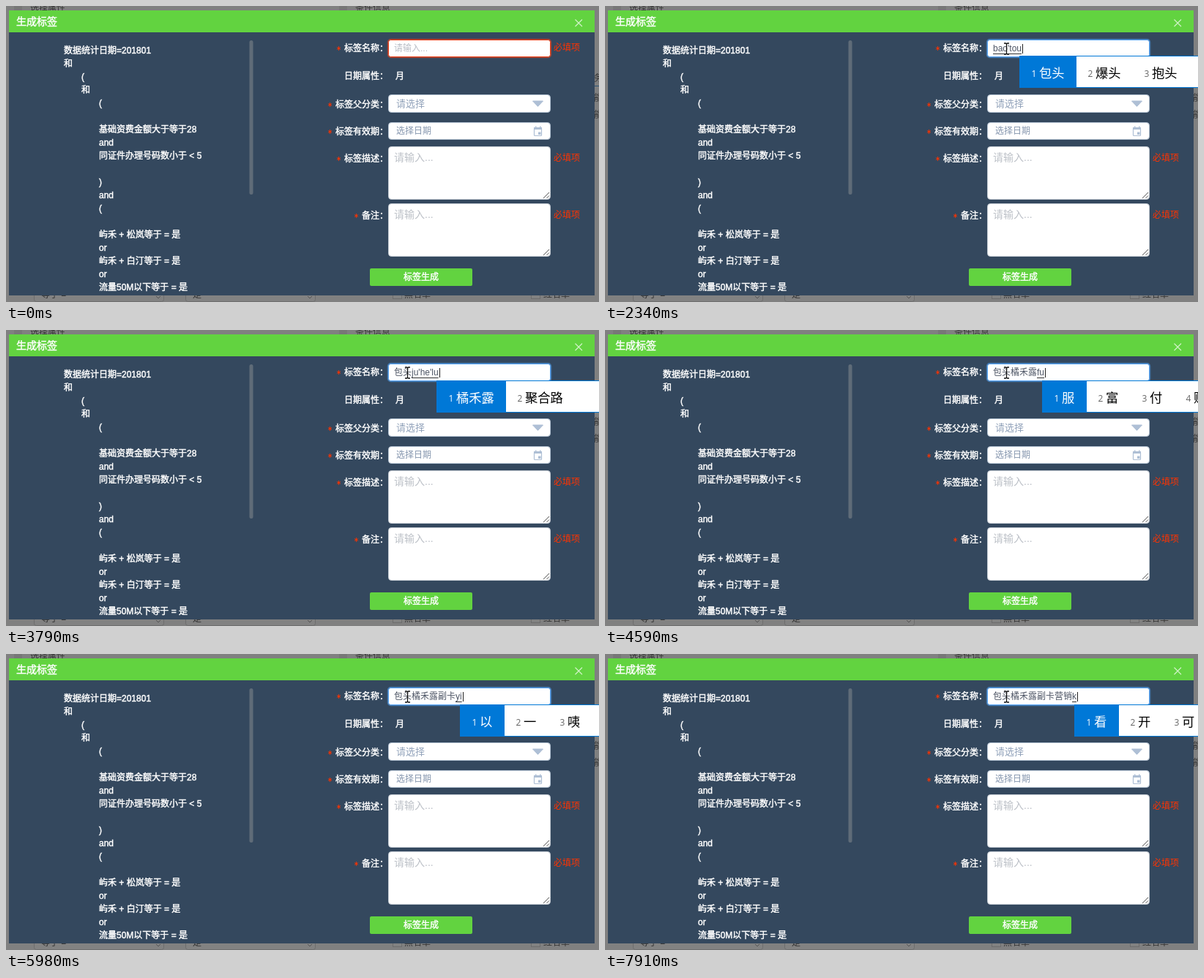
Animation of 810x405 px, one loop 8000 ms. Source, as an HTML page:

```html
<!DOCTYPE html>
<html lang="zh-CN">
<head>
<meta charset="utf-8">
<title>生成标签</title>
<style>
  html, body { margin: 0; width: 100%; height: 100%; overflow: hidden; background: #808080; }
  svg { display: block; width: 100%; height: 100%; }
  text { font: 400 12px "Liberation Sans", "Noto Sans CJK SC", "Noto Sans CJK", sans-serif; white-space: pre; }
  .strong { stroke: #fff; stroke-width: .45px; }
  .num { font: 400 12px "Open Sans", "Noto Sans", sans-serif; }
  .han { font: 400 17.3px "Noto Sans CJK SC", "Noto Sans CJK", sans-serif; }
</style>
</head>
<body>
<svg id="stage" viewBox="0 0 810 405">
  <defs>
    <filter id="soft" x="-5%" y="-40%" width="110%" height="180%"><feGaussianBlur stdDeviation=".7"/></filter>
  </defs>
  <g id="page"></g>
  <g id="panel"></g>
  <g id="field">
    <rect id="glow" x="521.5" y="45.5" width="223" height="25" rx="4" fill="none" stroke-width="1.5" opacity=".6" filter="url(#soft)"/>
    <rect id="box" x="522.5" y="46.5" width="221" height="23" rx="3" fill="#fff"/>
    <text id="hint" x="530" y="62" fill="#b9bdc5">请输入...</text>
    <text id="done" x="530" y="62" fill="#4d5565"></text>
    <text id="comp" y="62" fill="#4d5565"></text>
    <rect id="under" y="65" height="1" fill="#333"/>
    <rect id="caret" y="52" width="1" height="13" fill="#222"/>
    <text id="need" x="748" y="61" fill="#ff3300">必填项</text>
  </g>
  <g id="ime"></g>
  <path id="arrow" d="M0 0V16L3.7 12.6L6.2 18.3L8.6 17.3L6.1 11.6H11Z" fill="#fff" stroke="#000" stroke-width=".9"/>
  <path id="beam" d="M-3.5 -7.5H-1L0 -6.5L1 -7.5H3.5M0 -6.5V6.5M-3.5 7.5H-1L0 6.5L1 7.5H3.5" fill="none" stroke="#111" stroke-width="1.3"/>
</svg>
<script>
const $ = id => document.getElementById(id);
const text = (x, y, s, fill, extra = '') =>
  `<text x="${x}" y="${y}" fill="${fill}" ${extra}>${s.replace(/</g, '&lt;')}</text>`;
const strong = (x, y, s, style = '') => text(x, y, s, '#fff', `class="strong" style="${style}"`);
const rect = (x, y, w, h, fill, extra = '') =>
  `<rect x="${x}" y="${y}" width="${w}" height="${h}" fill="${fill}" ${extra}/>`;
const line = (d, stroke, width = 1) =>
  `<path d="${d}" fill="none" stroke="${stroke}" stroke-width="${width}"/>`;

// Dimmed page behind the dialog
function drawPage() {
  const ink = '#343434', edge = '#6d6d6d';
  const frame = `stroke="${edge}"`;
  return rect(0, 0, 810, 405, '#808080') +
    rect(11, 0, 11, 6, '#777') + rect(455, 0, 11, 6, '#777') +
    text(33, 7, '选择属性', ink) + text(477, 7, '条件信息', ink) +
    rect(38.5, 380.5, 177, 24, '#828282', 'rx="3" ' + frame) +
    rect(245.5, 380.5, 177, 24, '#828282', 'rx="3" ' + frame) +
    text(48, 399, '等于 =', ink) + text(255, 399, '是', ink) +
    line('M205 397l3 3l3 -3M412 397l3 3l3 -3', '#555') +
    rect(528.5, 388.5, 12, 12, '#828282', frame) + text(544, 399, '黑名单', ink) +
    rect(717.5, 388.5, 12, 12, '#828282', frame) + text(734, 399, '红名单', ink) +
    rect(804, 109, 6, 1, '#2d5475') +
    text(803, 103, '务', ink) + text(803, 130, '能', ink) + text(803, 153, '能', ink);
}

// Rule text on the left: [indent level, text]; empty rows keep the rhythm
const rules = [
  [0, '数据统计日期=201801'], [0, '和'], [1, '('], [1, '和'], [2, '('], [2, ''],
  [2, '基础资费金额大于等于28'], [2, 'and'], [2, '同证件办理号码数小于 < 5'], [2, ''],
  [2, ')'], [2, 'and'], [2, '('], [2, ''],
  [2, '屿禾 + 松岚等于 = 是'], [2, 'or'], [2, '屿禾 + 白汀等于 = 是'], [2, 'or'],
  [2, '流量50M以下等于 = 是']
];

const red = '#ff3300';
function label(y, s, required = true) {
  const x = 510 - 12 * s.length;
  const star = `M${x - 7.5} ${y - 7}v6M${x - 10} ${y - 5.5}l5 3M${x - 10} ${y - 2.5}l5 -3`;
  return (required ? line(star, red, .9) : '') + strong(x, y, s + '：');
}
function area(y) {
  return rect(522.5, y + .5, 221, 72, '#fff', 'rx="4" stroke="#c3cad2"') +
    text(530, y + 20, '请输入...', '#bcc0c7', 'style="font-size:14px"') +
    line(`M734 ${y + 71}l8 -8M738.5 ${y + 71}l3.5 -3.5`, '#555') +
    text(748, y + 20, '必填项', red);
}

function drawPanel() {
  const icon = '#aebfd5', border = 'rx="4" stroke="#b4c3d3"';
  return rect(4, 6, 800, 390, '#34485e') + rect(4, 6, 800, 30, '#62d340') +
    strong(14, 26, '生成标签', 'font-size:14px') +
    line('M777.5 18.5l9.5 9.5M787 18.5l-9.5 9.5', '#d3f3ca', 1.1) +
    rect(332.5, 47, 5, 211, '#5f6c78', 'rx="2.5"') +
    rules.map(([n, s], i) => strong(79 + 24 * n, 65 + 18 * i, s)).join('') +
    label(62, '标签名称') + label(100, '日期属性', false) + strong(532, 100, '月') +
    label(139, '标签父分类') + label(176, '标签有效期') +
    label(213, '标签描述') + label(291, '备注') +
    rect(522.5, 121.5, 221, 24, '#fff', border) +
    text(533, 138, '请选择', '#91a2ba', 'style="font-size:13px"') +
    `<path d="M719.5 130H733.5L726.5 137.5Z" fill="${icon}" stroke="${icon}" stroke-linejoin="round"/>` +
    rect(522.5, 159.5, 221, 23, '#fff', border) +
    text(533, 175, '选择日期', '#8596ae') +
    rect(721.5, 166.5, 10, 11, '#fff', `rx="1" stroke="${icon}" stroke-width="1.2"`) +
    rect(721, 166, 11, 3, icon) + rect(723, 164.5, 1.5, 3, icon) + rect(729, 164.5, 1.5, 3, icon) +
    rect(727, 172.5, 3.5, 3.5, icon) +
    area(192) + area(270) +
    rect(497, 359, 140, 24, '#62d340', 'rx="2"') + strong(543, 375, '标签生成');
}

// [time, accepted text, letters being composed, candidates]
const a = '包头', b = a + '橘禾露', c = b + '副卡', d = c + '营销';
const steps = [
  [0, '', '', ''],
  [1800, '', 'b', '不 吧 把 被'],
  [1935, '', 'ba', '吧 把 八 爸'],
  [2070, '', 'bao', '包 报 抱 宝'],
  [2205, '', "bao't", '包头 抱团 暴徒'],
  [2340, '', "bao'tou", '包头 爆头 抱头'],
  [2620, a, '', ''],
  [2900, a, 'j', ''],
  [3020, a, 'j', '就 将 及 家 级'],
  [3140, a, 'ju', '就 据 局 句 举'],
  [3410, a, "ju'h", '聚会 菊花 句话'],
  [3535, a, "ju'he", '聚合 句和 据和'],
  [3660, a, "ju'he'l", '聚合了 聚合力'],
  [3790, a, "ju'he'lu", '橘禾露 聚合路'],
  [4320, b, '', ''],
  [4450, b, 'f', '发 分 放 非'],
  [4590, b, 'fu', '服 富 付 赋'],
  [4880, b, "fu'k", '付款 副科 富矿'],
  [5020, b, "fu'ka", '副卡 付卡 浮卡'],
  [5550, c, '', ''],
  [5700, c, 'y', ''],
  [5840, c, 'y', '有 一 要 也'],
  [5980, c, 'yi', '以 一 咦 已'],
  [6130, c, 'yin', '因 音 引 银'],
  [6260, c, 'ying', '应 英 影 赢'],
  [6400, c, "ying'xi", '影戏 迎喜'],
  [6530, c, "ying'xia", '影下 应下'],
  [6950, c, "ying'xiao", '影下 应下'],
  [7070, c, "ying'xiao", '营销 影效'],
  [7480, d, '', ''],
  [7910, d, 'k', '看 开 可 快']
];

function drawIme(left, top, words) {
  let x = left, out = rect(left, top, 900, 44, '#fff') + rect(left, top, 900, 1, '#0078d7') +
    rect(left, top + 43, 900, 1, '#0078d7');
  words.forEach((w, i) => {
    const width = 43 + 17 * w.length;
    if (!i) out += rect(x, top, width + 1, 44, '#0078d7');
    out += text(x + 16.5, top + 28.5, String(i + 1), i ? '#666' : '#fff', 'class="num"') +
      text(x + 27, top + 30, w, i ? '#000' : '#fff', 'class="han"');
    x += width;
  });
  return out;
}

const show = (id, on) => { $(id).style.display = on ? '' : 'none'; };

function drawField([, done, comp, words], focused) {
  const filled = done || comp;
  const start = 530 + 12 * done.length;
  $('done').textContent = done;
  $('comp').textContent = comp;
  $('comp').setAttribute('x', start);
  const width = comp ? $('comp').getComputedTextLength() : 0;
  const caret = start + Math.round(width) + (comp ? 1 : 0);
  $('under').setAttribute('x', start);
  $('under').setAttribute('width', width);
  $('caret').setAttribute('x', caret);
  show('caret', focused);
  show('hint', !filled);
  show('need', !filled);
  $('box').setAttribute('stroke', filled ? '#57a3f3' : '#e8401a');
  $('glow').setAttribute('stroke', filled ? '#4d97e0' : '#e0411c');
  $('ime').innerHTML = words ? drawIme(caret - 4, done ? 69 : 68, words.split(' ')) : '';
}

// The pointer glides in with eight sampled positions, then settles
function drawPointer(t) {
  const k = Math.min(7, Math.floor((t - 410) / 141.4)) / 7;
  const ease = k * (2 - k);
  const x = Math.round(440 + 108 * ease);
  const y = t >= 1520 ? 58 : Math.round(21 + 35 * ease);
  const inside = x > 522 && y > 46;
  show('arrow', t >= 410 && !inside);
  show('beam', t >= 410 && inside);
  for (const id of ['arrow', 'beam']) $(id).setAttribute('transform', `translate(${x + .5} ${y + .5})`);
}

$('page').innerHTML = drawPage();
$('panel').innerHTML = drawPanel();

const begin = performance.now();
let last = '';
function tick() {
  const t = (performance.now() - begin) % 8000;
  let i = steps.length - 1;
  while (steps[i][0] > t) i--;
  const focused = t >= 1400;
  const key = i + '/' + focused;
  if (key !== last) drawField(steps[i], focused);
  last = key;
  drawPointer(t);
  requestAnimationFrame(tick);
}
tick();
</script>
</body>
</html>
```
